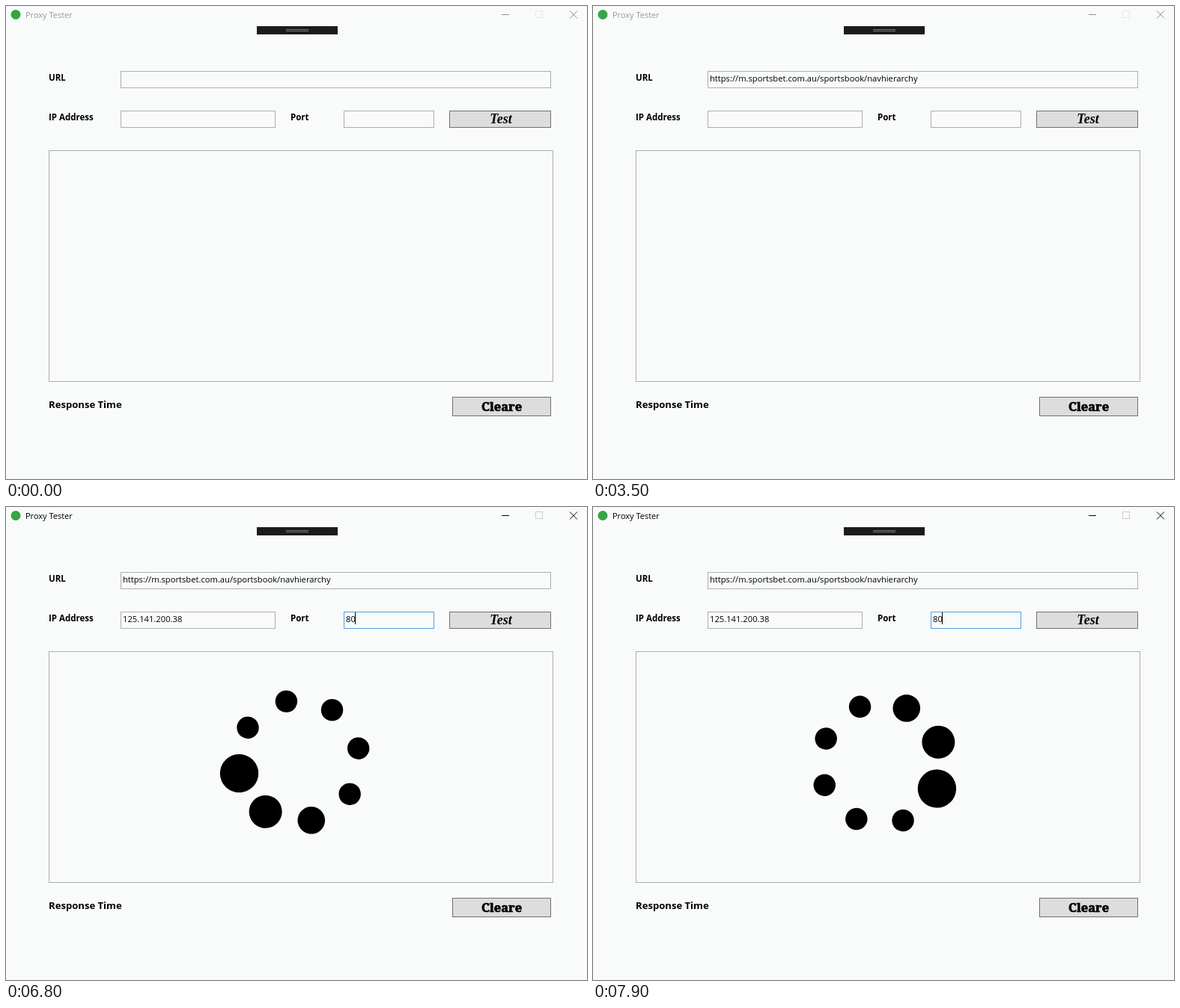
An HTML page for the animation above (8000 ms loop, 776 by 633 pixels).

```html
<!DOCTYPE html>
<html lang="en">
<head>
<meta charset="utf-8">
<title>Proxy Tester</title>
<style>
  html, body { margin: 0; width: 100%; height: 100%; overflow: hidden; background: #f9fbfb; }
  svg { display: block; }
  text { font: 11.2px "Open Sans", "Noto Sans", sans-serif; white-space: pre; }
  .label { font-weight: 700; font-size: 11.5px; }
  .field { fill: none; stroke: #abadb3; }
  .button { fill: #ddd; stroke: #707070; }
  .caption { text-anchor: middle; font-weight: 700; }
  .test { font: italic 700 18px "Liberation Serif", serif; }
  .clear { font: 900 16.5px "Noto Serif", serif; stroke: #000; stroke-width: .7; }
</style>
</head>
<body>
<svg width="776" height="633" viewBox="0 0 776 633">
  <rect width="776" height="633" fill="#f9fbfb"/>

  <circle cx="13" cy="11.5" r="6.5" fill="#35a545"/>
  <text id="title" x="26" y="16" style="font-size:11px">Proxy Tester</text>
  <path id="controls" d="M662 11.5h10M753 6.5l10 10M763 6.5l-10 10" fill="none"/>
  <rect id="maximize" x="707.5" y="6.5" width="9" height="9" fill="none"/>
  <rect x="335" y="27" width="108" height="11" fill="#1b1b1c"/>
  <path d="M374 31.5h30M374 33.5h30" stroke="#777"/>

  <text class="label" x="57" y="100">URL</text>
  <text class="label" x="57" y="153">IP Address</text>
  <text class="label" x="380" y="153">Port</text>
  <text class="label" x="57" y="538" style="font-size:13.1px">Response Time</text>

  <rect id="urlBox" class="field" x="153.5" y="87.5" width="574" height="22"/>
  <rect id="ipBox" class="field" x="153.5" y="140.5" width="206" height="22"/>
  <rect id="portBox" class="field" x="451.5" y="140.5" width="120" height="22"/>
  <rect id="resultBox" class="field" x="57.5" y="193.5" width="673" height="309"/>
  <text id="urlText" x="156" y="101"></text>
  <text id="ipText" x="156" y="154"></text>
  <text id="portText" x="454" y="154"></text>
  <rect id="caret" width="1" height="16"/>

  <rect id="testButton" class="button" x="592.5" y="140.5" width="135" height="22"/>
  <text class="caption test" x="661" y="157">Test</text>
  <rect class="button" x="596.5" y="523.5" width="131" height="25"/>
  <text class="caption clear" x="662" y="542">Cleare</text>

  <g id="spinner"></g>
</svg>
<script>
const LOOP = 8000, SPINNER_START = 6700;
const FOCUS = '#569de5', HOVER = '#7eb4ea', IDLE = '#abadb3';
const $ = id => document.getElementById(id);

// Eight dots on a ring whose centre sits slightly off the turning axis.
for (let i = 0; i < 8; i++) {
  const dot = document.createElementNS('http://www.w3.org/2000/svg', 'circle');
  const angle = -i * Math.PI / 4;
  dot.setAttribute('cx', -2.82 + 81.3 * Math.cos(angle));
  dot.setAttribute('cy', 2.27 + 81.3 * Math.sin(angle));
  dot.setAttribute('r', Math.max(14.7, 25.7 - 3.7 * i));
  $('spinner').append(dot);
}

// Caret visibility: [from, to, x, y]
const carets = [
  [1200, 1400, 156, 88], [1900, 2400, 435, 88], [2900, 3400, 435, 88],
  [5300, 5500, 156, 141], [5800, 6200, 454, 141], [6400, 6500, 460, 141],
  [6500, 7000, 466, 141], [7500, LOOP, 466, 141]
];

function draw(t) {
  const during = (from, to) => t >= from && t < to;
  const border = (id, focused, hovered, focusColor = FOCUS) =>
    $(id).style.stroke = focused ? focusColor : hovered ? HOVER : IDLE;

  const active = during(1100, 3400) || t >= 5200;
  $('title').style.fill = active ? '#000' : '#999';
  $('controls').style.stroke = active ? '#000' : '#8c8c8c';
  $('maximize').style.stroke = active ? '#ccc' : '#e6e8e8';

  border('urlBox', during(1200, 3500), false, '#8c9196');
  border('ipBox', during(5300, 5800), during(2000, 2200));
  border('portBox', t >= 5800, during(1900, 2000) || during(4700, 4800));
  border('resultBox', false, during(200, 400));

  const pointed = during(500, 700);
  $('testButton').style.fill = pointed ? '#bee6fd' : '#ddd';
  $('testButton').style.stroke = pointed ? '#3c7fb1' : '#707070';

  $('urlText').textContent = t >= 1400 ? 'https://m.sportsbet.com.au/sportsbook/navhierarchy' : '';
  $('ipText').textContent = t >= 5500 ? '125.141.200.38' : '';
  $('portText').textContent = '80'.slice(0, t >= 6500 ? 2 : t >= 6400 ? 1 : 0);

  const caret = carets.find(([from, to]) => during(from, to));
  $('caret').style.display = caret ? '' : 'none';
  if (caret) {
    $('caret').setAttribute('x', caret[2]);
    $('caret').setAttribute('y', caret[3]);
  }

  const turn = 148.5 + 19.65 * Math.floor((t - SPINNER_START) / 100);
  $('spinner').style.display = t >= SPINNER_START ? '' : 'none';
  $('spinner').setAttribute('transform', `translate(388.8 342.5) rotate(${turn})`);
}

const start = performance.now();
function tick() {
  draw((performance.now() - start) % LOOP);
  requestAnimationFrame(tick);
}
tick();
</script>
</body>
</html>
```
